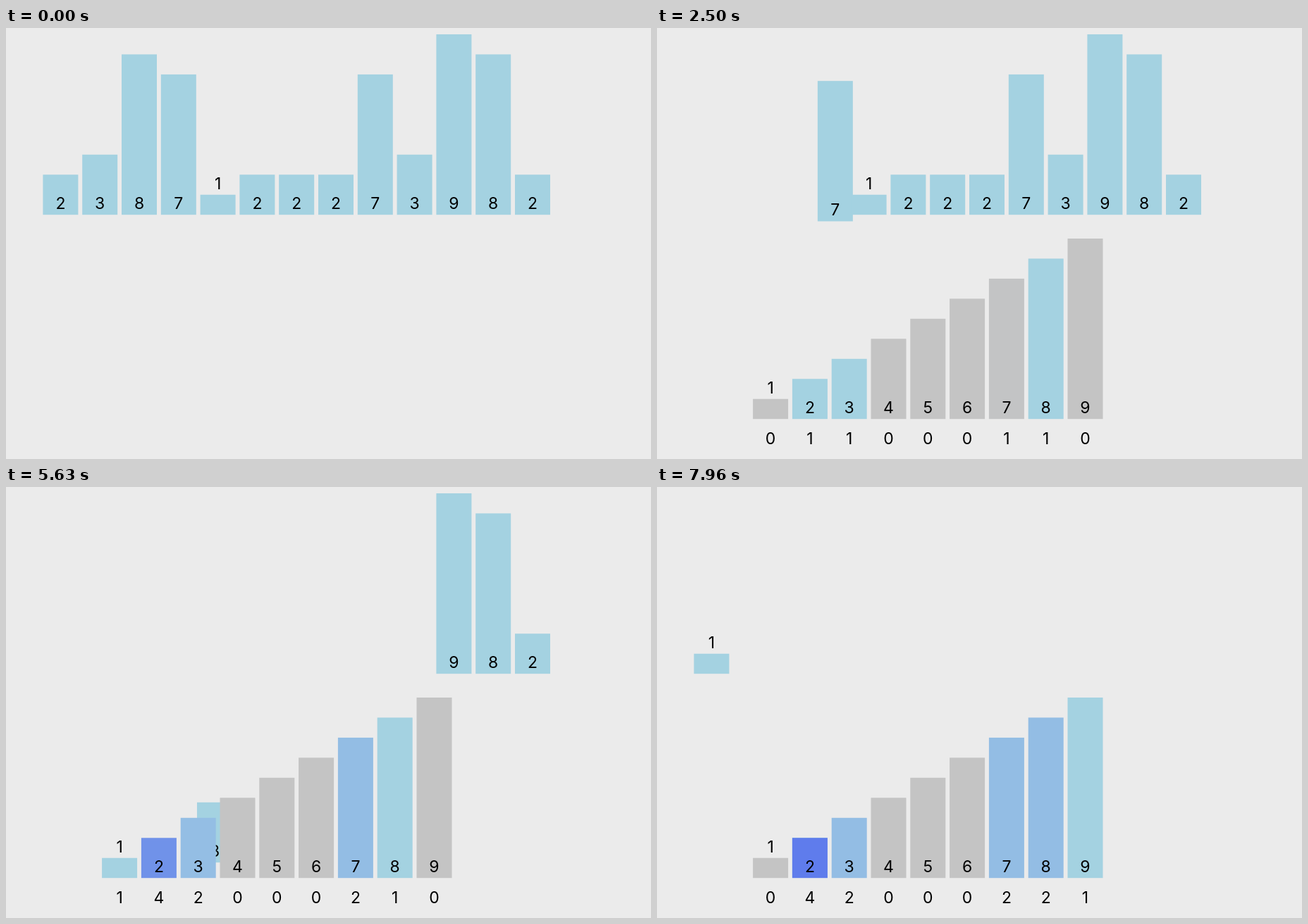
Write an HTML page with a canvas that moves like this. It is 915 by 612 pixels and loops after 8 s.

```html
<!DOCTYPE html>
<html lang="en">
<head>
<meta charset="utf-8">
<title>Counting sort</title>
<style>
  html, body { margin: 0; width: 100%; height: 100%; overflow: hidden; background: #ebebeb; }
  canvas { display: block; }
</style>
</head>
<body>
<canvas id="stage" width="915" height="612"></canvas>
<script>
const ctx = document.getElementById('stage').getContext('2d');
const LOOP = 8000, TICK = 1000 / 15;
const BUCKETS_APPEAR = 480, FIRST_MOVE = 950, MOVE_EVERY = 500, MOVE_TIME = 250;
const STEP = 55.8, BAR_WIDTH = 50, UNIT = 28.47;
const ROW_BOTTOM = 265.2, BUCKET_BOTTOM = 555.2;

const input = [2, 3, 8, 7, 1, 2, 2, 2, 7, 3, 9, 8, 2];
const output = [1, 2];

const slot = i => ({ x: 52.4 + STEP * i, y: ROW_BOTTOM });
const bucket = v => ({ x: 136.1 + STEP * (v - 1), y: BUCKET_BOTTOM });
const moves = [
  ...input.map((value, i) => ({ value, from: slot(i), to: bucket(value), change: 1 })),
  ...output.map((value, i) => ({ value, from: bucket(value), to: slot(i), change: -1 }))
];
moves.forEach((move, i) => move.start = FIRST_MOVE + MOVE_EVERY * i);

const clamp = x => Math.min(1, Math.max(0, x));
const easeCubic = x => x < 0.5 ? 4 * x ** 3 : 1 - 4 * (1 - x) ** 3;
const mix = (a, b, p) => a + (b - a) * p;
const progress = (move, t) => easeCubic(clamp((t - move.start) / MOVE_TIME));

// Empty buckets are grey; fuller ones run from light to royal blue.
function countColor(n) {
  if (n === 0) return [196, 196, 196];
  return [164 - 17.3 * (n - 1), 210 - 21.5 * (n - 1), 225 + 2.8 * (n - 1)];
}
const css = rgb => `rgb(${rgb.map(Math.round).join(',')})`;

function label(text, x, y) {
  ctx.fillStyle = '#000';
  ctx.fillText(text, x + BAR_WIDTH / 2, y);
}

function bar(value, x, bottom, rgb) {
  const height = value * UNIT;
  ctx.fillStyle = css(rgb);
  ctx.fillRect(x, bottom - height, BAR_WIDTH, height);
  label(value, x, bottom - 8 - (value === 1 ? UNIT : 0));
}

function drawItem(move, t) {
  const entering = move.change > 0;
  const p = progress(move, t);
  if (entering ? p === 1 : t < move.start) return;
  const { from, to } = move;
  bar(move.value, mix(from.x, to.x, p), mix(from.y, to.y, p), countColor(1));
}

function drawBucket(value, t) {
  let count = 0, color = countColor(0);
  for (const move of moves) {
    if (move.value !== value || t < move.start) continue;
    const before = countColor(count);
    count += move.change;
    const after = countColor(count), p = progress(move, t);
    color = before.map((c, i) => mix(c, after[i], p));
  }
  const { x, y } = bucket(value);
  bar(value, x, y, color);
  label(count, x, 591.4);
}

function draw(t) {
  ctx.fillStyle = '#ebebeb';
  ctx.fillRect(0, 0, 915, 612);
  ctx.font = '23px Inter, "Liberation Sans", sans-serif';
  ctx.textAlign = 'center';
  moves.forEach(move => drawItem(move, t));
  if (t < BUCKETS_APPEAR) return;
  for (let value = 1; value <= 9; value++) drawBucket(value, t);
}

// The motion is stepped at 15 pictures a second.
const stepped = t => (Math.floor((t + 7) / TICK - 0.5) + 0.5) * TICK;

let origin = null;
function frame(now) {
  origin ??= now;
  draw(stepped((now - origin) % LOOP));
  requestAnimationFrame(frame);
}
draw(0);
requestAnimationFrame(frame);
</script>
</body>
</html>
```
